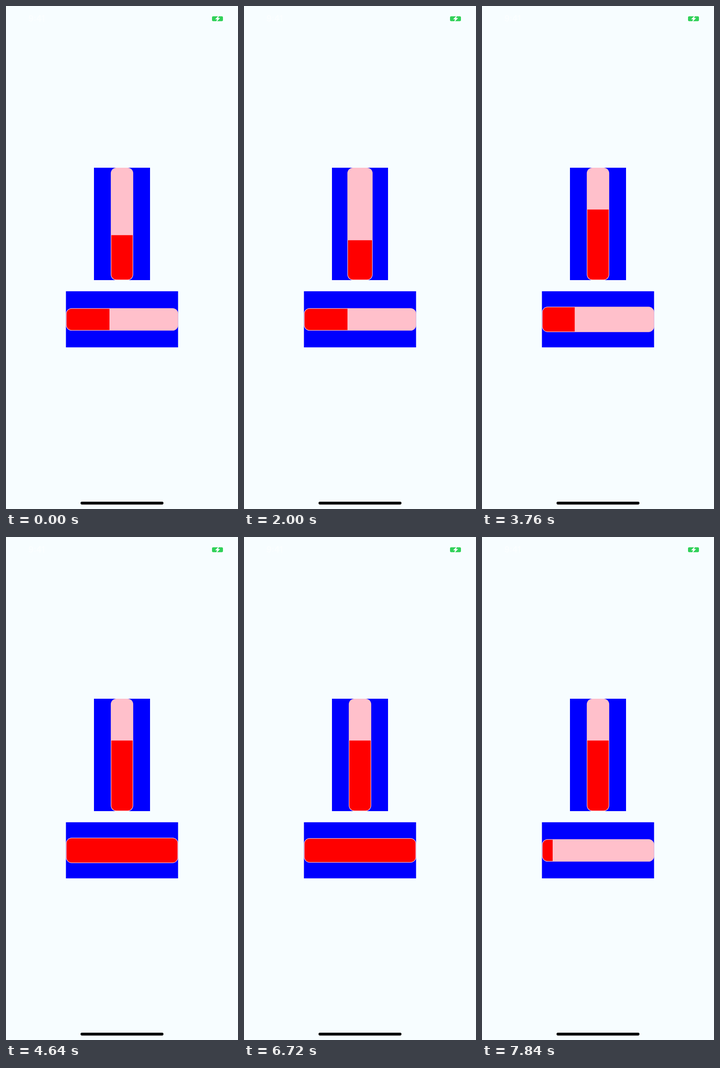
These frames come from a looping animation (509x1101 px, 8 s). An HTML page:

```html
<!DOCTYPE html>
<html lang="en">
<head>
<meta charset="utf-8">
<title>Two sliders</title>
<style>
  html, body { margin: 0; width: 100%; height: 100%; overflow: hidden; background: #f7fdff; }
  svg { display: block; width: 509px; height: 1101px; }
  .panel { fill: #00f; }
  .track { fill: #ffc0cb; }
  .fill { fill: #f00; }
  .clock { font: 600 18px Inter, Arial, sans-serif; fill: #fff; opacity: .6; }
</style>
</head>
<body>
<svg viewBox="0 0 509 1101">
  <defs>
    <clipPath id="clipV"><rect id="innerV"/></clipPath>
    <clipPath id="clipH"><rect id="innerH"/></clipPath>
  </defs>
  <text class="clock" x="49" y="34">9:41</text>
  <rect x="452" y="22.4" width="24" height="10.8" rx="2.6" fill="#30d158"/>
  <path d="M467 21.2 459.5 28.7H463.6L461.5 34.4 469 26.8H464.8Z" fill="#fff" stroke="#f7fdff" stroke-width=".8"/>

  <rect class="panel" x="193" y="354" width="123" height="246"/>
  <rect class="track" id="trackV"/>
  <g clip-path="url(#clipV)"><rect class="fill" id="fillV"/></g>

  <rect class="panel" x="131.5" y="624.4" width="246" height="122.8"/>
  <rect class="track" id="trackH"/>
  <g clip-path="url(#clipH)"><rect class="fill" id="fillH"/></g>

  <rect x="163.5" y="1085" width="182" height="6.2" rx="3.1"/>
</svg>
<script>
  const LOOP = 8000, STEP = 80;
  const REST = 49.2, HELD = 55.3, RADIUS = 12.3, BORDER = 1.25;
  const LENGTH = 246, MID_X = 254.5, MID_Y = 686, TOP = 354, LEFT = 131.7;
  const FULL = 376.4;

  // [time, edge of the red fill]
  const edgeV = [[1040, 501.6], [1440, 405], [2000, 512.7], [2160, 535], [2480, 445.5]];
  const edgeH = [
    [2960, 227], [3360, 320], [3760, 203.4], [3920, 140], [4640, FULL],
    [5840, FULL], [5920, 352.4], [6320, 150], [6400, 150], [6640, FULL],
    [6960, FULL], [7360, 155]
  ];

  // [time, thickness], from press and release spans
  const press = (...spans) => spans.flatMap(([down, up, end]) =>
    [[down, REST], [down + 240, HELD], [up, HELD], [end, REST]]);
  const sizeV = press([1040, 2400, 2720]);
  const sizeH = press([2960, 4720, 5040], [5920, 6640, 6880], [6960, 7520, 7840]);

  function at(keys, t) {
    const i = keys.findIndex(k => k[0] > t);
    if (i === 0) return keys[0][1];
    if (i < 0) return keys[keys.length - 1][1];
    const [t0, a] = keys[i - 1], [t1, b] = keys[i];
    return a + (b - a) * (t - t0) / (t1 - t0);
  }

  function setRect(id, x, y, width, height, rx = 0) {
    const el = document.getElementById(id);
    for (const [k, v] of Object.entries({ x, y, width, height, rx })) el.setAttribute(k, v);
  }

  function drawTrack(name, x, y, w, h) {
    setRect("track" + name, x, y, w, h, RADIUS);
    setRect("inner" + name, x + BORDER, y + BORDER, w - 2 * BORDER, h - 2 * BORDER, RADIUS - BORDER);
  }

  function draw(t) {
    const v = at(sizeV, t), top = at(edgeV, t);
    drawTrack("V", MID_X - v / 2, TOP, v, LENGTH);
    setRect("fillV", MID_X - v / 2, top, v, TOP + LENGTH - top);

    const h = at(sizeH, t), right = at(edgeH, t);
    drawTrack("H", LEFT, MID_Y - h / 2, LENGTH, h);
    setRect("fillH", LEFT, MID_Y - h / 2, right - LEFT, h);
  }

  const start = performance.now();
  function frame() {
    const t = (performance.now() - start) % LOOP;
    draw(Math.floor(t / STEP) * STEP);
    requestAnimationFrame(frame);
  }
  frame();
</script>
</body>
</html>
```
